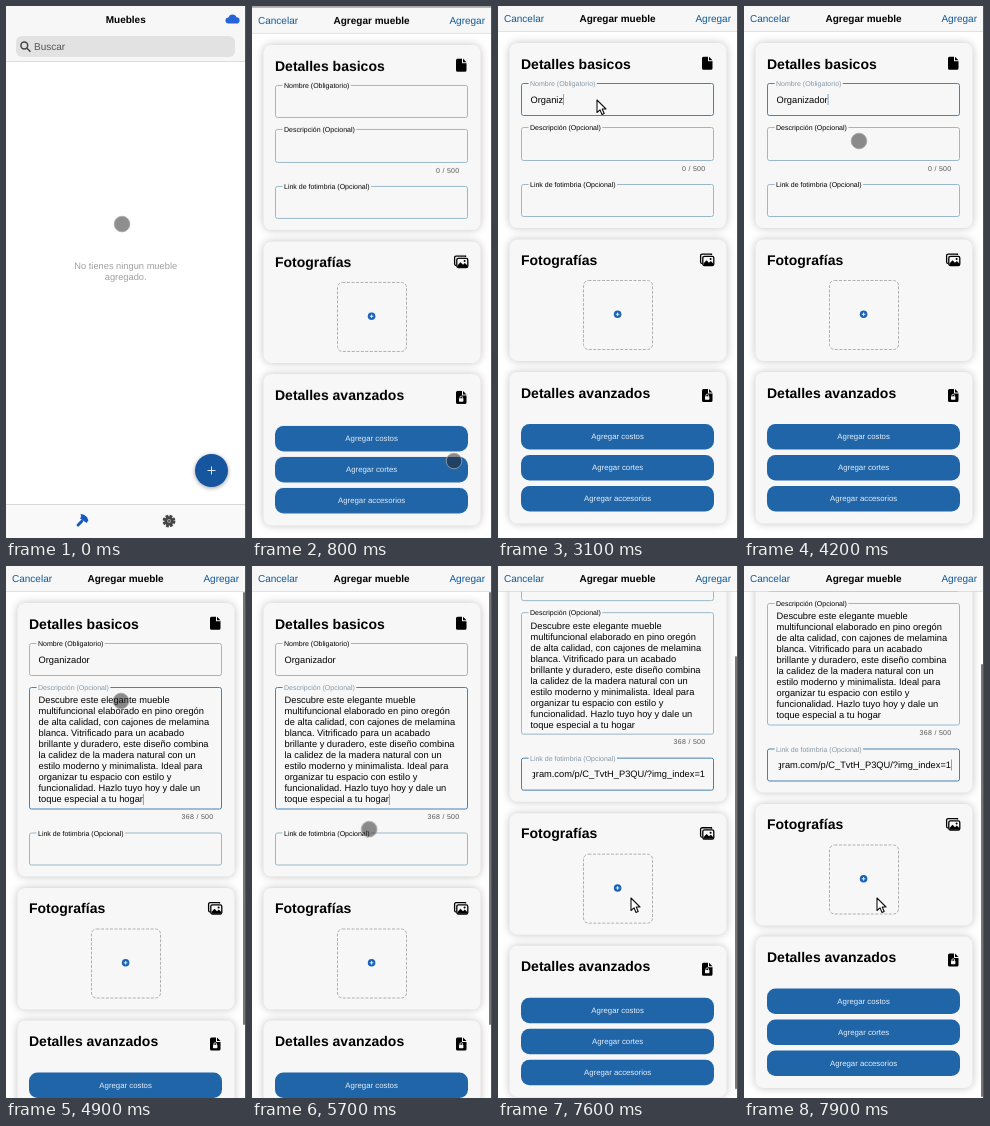
Animation, 240 px wide and 532 px high, one loop 8000 ms. Source, as an HTML page:

```html
<!DOCTYPE html>
<html lang="es">
<head>
<meta charset="utf-8">
<title>Agregar mueble</title>
<style>
  html, body { margin: 0; width: 100%; height: 100%; overflow: hidden; background: #fff; }
  svg { display: block; width: 100vw; height: 100vh; }
  text { font-family: "Liberation Sans", Arial, sans-serif; text-rendering: geometricPrecision; white-space: pre; }
  .title { font-size: 10px; font-weight: bold; text-anchor: middle; }
  .link { font-size: 10px; fill: #0f5898; }
  .heading { font-size: 14px; font-weight: bold; }
  .empty { font-size: 9.3px; fill: #a0a0a0; text-anchor: middle; }
  .value { font-size: 9.3px; fill: #000; }
  .count { font-size: 7px; letter-spacing: .3px; fill: #555; text-anchor: end; }
  .button rect { fill: #2065a8; }
  .button text { font-size: 7.8px; fill: #e4eef8; text-anchor: middle; }

  .card { fill: #f7f7f7; filter: drop-shadow(0 0 4px rgba(0, 0, 0, .24)); }
  .field rect { fill: none; stroke: #9bb8c8; }
  .field .label { font-size: 7px; fill: #000; stroke: #f7f7f7; stroke-width: 4px; paint-order: stroke; }
  .field.focus rect { stroke: #4583b0; }
  .field.focus .label { fill: #8799a8; }
  #caret { fill: #5f90b4; }

  /* The description grows once its text arrives */
  #thumb { visibility: hidden; }
  .long #thumb { visibility: visible; }
  .long .below { transform: translateY(88.5px); }
  .long #basics { height: 273.5px; }
  .long #desc rect { height: 121.5px; }

  #modal { animation: rise 8s linear infinite; }
  #shade { animation: dim 8s linear infinite; }
  #page { animation: scroll 8s linear infinite; }
  #thumb { animation: thumb 8s linear infinite; }
  #cursor { animation: move 8s ease-in-out infinite; }
  #dot { animation: dot 8s step-end infinite; }
  #arrow { animation: arrow 8s step-end infinite; }

  @keyframes rise {
    0%, 4.875% { transform: translateY(532px); animation-timing-function: cubic-bezier(.32, .72, 0, 1); }
    11.125%, 100% { transform: none; }
  }
  @keyframes dim {
    0%, 4.875% { opacity: 0; }
    11.125%, 100% { opacity: .4; }
  }
  @keyframes scroll {
    0%, 91% { transform: none; animation-timing-function: cubic-bezier(.3, .2, .3, 1); }
    97.5%, 100% { transform: translateY(-84px); }
  }
  @keyframes thumb {
    0%, 91% { transform: none; animation-timing-function: cubic-bezier(.3, .2, .3, 1); }
    97.5%, 100% { transform: translateY(72px); }
  }
  @keyframes move {
    0% { transform: translate(116px, 218px); }
    4%, 12.5% { transform: translate(202px, 455px); }
    22%, 45% { transform: translate(99px, 94px); }
    52%, 66.5% { transform: translate(115px, 135px); animation-timing-function: ease-in; }
    71.25% { transform: translate(117px, 263px); animation-timing-function: ease-out; }
    75%, 87.5% { transform: translate(143px, 290px); }
    92.5%, 100% { transform: translate(133px, 332px); }
  }
  @keyframes dot {
    0%, 46% { visibility: visible; }
    23%, 90%, 100% { visibility: hidden; }
  }
  @keyframes arrow {
    0%, 46% { visibility: hidden; }
    23%, 90%, 100% { visibility: visible; }
  }
</style>
</head>
<body>
<svg id="stage" viewBox="0 0 240 532" preserveAspectRatio="none">
  <defs>
    <clipPath id="linkClip"><rect x="34.6" y="184" width="174" height="24"/></clipPath>
    <path id="sheet" d="M1.5 0H6V4.5H10.5V11.5a1.5 1.5 0 0 1-1.5 1.5H1.5A1.5 1.5 0 0 1 0 11.5V1.5A1.5 1.5 0 0 1 1.5 0ZM7 0L10.5 3.5H7Z"/>
  </defs>

  <g id="list">
    <rect width="240" height="532" fill="#fff"/>
    <rect width="240" height="55" fill="#f7f7f7"/>
    <rect y="55" width="240" height="1" fill="#dcdcdc"/>
    <text class="title" x="119.7" y="16.5">Muebles</text>
    <path fill="#2464d8" d="M222.5 17.5a3 3 0 0 1 0-6a4.2 4.2 0 0 1 8-.2a3.1 3.1 0 0 1 0 6.2Z"/>
    <rect x="10" y="30" width="219" height="21" rx="6" fill="#e2e2e2"/>
    <g fill="none" stroke="#444" stroke-width="1.5" stroke-linecap="round">
      <circle cx="18.3" cy="39.5" r="3.4"/>
      <path d="M21 42.2L24 45.2"/>
    </g>
    <text x="28" y="44.3" font-size="10" fill="#555">Buscar</text>
    <text class="empty" x="119.7" y="263.3">No tienes ningun mueble</text>
    <text class="empty" x="119.7" y="274.3">agregado.</text>
    <circle cx="205.5" cy="464.5" r="16.5" fill="#15569e" style="filter:drop-shadow(0 1.5px 2px rgba(0,0,0,.4))"/>
    <path d="M201.5 464.5h8M205.5 460.5v8" stroke="#dce8f4"/>
    <rect y="498" width="240" height="34" fill="#f9f9f9"/>
    <rect y="498" width="240" height="1" fill="#d8d8d8"/>
    <g transform="translate(76 515) rotate(-45)" fill="#1558c0">
      <path d="M-5-5Q-2-7 2-6L5-4V-1H-3V-3Z" transform="rotate(78)"/>
      <rect x="-7" y="-1.400" width="8" height="2.800" rx="1" transform="rotate(-1)"/>
    </g>
    <g transform="translate(163 515)">
      <circle r="4.7" fill="#444"/>
      <circle r="5.3" fill="none" stroke="#444" stroke-width="2.2" stroke-dasharray="2.8 1.36"/>
      <circle r="1.9" fill="#aaa"/>
      <circle r="1" fill="#444"/>
    </g>
  </g>

  <rect id="shade" width="240" height="532"/>

  <g id="modal">
    <rect width="240" height="533" fill="#fff"/>
    <g id="page">
      <rect id="basics" class="card" x="11.5" y="37" width="217" height="185" rx="8"/>
      <text class="heading" x="23" y="62.7">Detalles basicos</text>
      <use href="#sheet" x="204" y="50.7"/>

      <g id="name" class="field">
        <rect x="23.5" y="77.5" width="192" height="32" rx="2"/>
        <text class="label" x="32" y="80.3">Nombre (Obligatorio)</text>
        <text id="nameText" class="value" x="32.5" y="96.5"></text>
      </g>
      <g id="desc" class="field">
        <rect x="23.5" y="121.5" width="192" height="33" rx="2"/>
        <text class="label" x="32" y="124.3">Descripción (Opcional)</text>
        <g id="descText"></g>
      </g>
      <g class="below">
        <text id="count" class="count" x="207.5" y="164.5">0 / 500</text>
        <g id="link" class="field">
          <rect x="23.5" y="178.5" width="192" height="32" rx="2"/>
          <text class="label" x="32" y="181.3">Link de fotimbria (Opcional)</text>
          <g clip-path="url(#linkClip)">
            <text id="linkText" class="value" x="207" y="197.5" text-anchor="end"></text>
          </g>
        </g>

        <rect class="card" x="11.5" y="233.5" width="217" height="121.5" rx="8"/>
        <text class="heading" x="23" y="258.7">Fotografías</text>
        <g transform="translate(202 247.5)" fill="none" stroke="#000" stroke-width="1.3">
          <path d="M11.500 1.500V.6H2.200A1.600 1.600 0 0 0 .6 2.200V8.500a1.500 1.500 0 0 0 1.500 1.500"/>
          <rect x="2.8" y="2.800" width="11" height="9.200" rx="1.600"/>
          <path d="M3.500 11.500V10L6.500 6.800L9 9.200L10.800 7.600L13.300 10V11.500Z" fill="#000" stroke="none"/>
          <circle cx="10.600" cy="5.500" r="1" fill="#000" stroke="none"/>
        </g>
        <rect x="85.500" y="274.500" width="69" height="69" rx="5" fill="none" stroke="#b0b0b0" stroke-dasharray="3 1.5"/>
        <circle cx="119.6" cy="308.3" r="3.8" fill="#1b62b8"/>
        <path d="M117.8 308.3h3.6M119.6 306.5v3.6" stroke="#dff" stroke-width=".9"/>

        <rect class="card" x="11.5" y="366" width="217" height="151.5" rx="8"/>
        <text class="heading" x="23" y="391.7">Detalles avanzados</text>
        <use href="#sheet" x="204" y="383"/>
        <rect x="207" y="390.300" width="4.400" height="3.400" rx=".6" fill="#f7f7f7"/>
        <path d="M207.900 390.500v-1a1.300 1.300 0 0 1 2.600 0v1" fill="none" stroke="#f7f7f7" stroke-width=".8"/>
        <g class="button"><rect x="23" y="418" width="193" height="25.5" rx="8.5"/><text x="119.6" y="433">Agregar costos</text></g>
        <g class="button"><rect x="23" y="449" width="193" height="25.5" rx="8.5"/><text x="119.6" y="464">Agregar cortes</text></g>
        <g class="button"><rect x="23" y="480" width="193" height="25.5" rx="8.5"/><text x="119.6" y="495">Agregar accesorios</text></g>
      </g>
      <rect id="caret" width=".8" height="11"/>
    </g>
    <rect width="240" height="25" fill="#f7f7f7"/>
    <rect y="25" width="240" height=".7" fill="#d4d4d4"/>
    <text class="link" x="6" y="16.2">Cancelar</text>
    <text class="title" x="119.6" y="16.2">Agregar mueble</text>
    <text class="link" x="233" y="16.2" text-anchor="end">Agregar</text>
    <rect id="thumb" x="237" y="26" width="2" height="433" rx="1" fill="#777"/>
  </g>

  <rect x="239" width="1" height="532" fill="#555"/>

  <g id="cursor">
    <circle id="dot" r="7.8" fill="rgba(30,30,30,.5)" stroke="rgba(165,165,165,.8)"/>
    <path id="arrow" d="M0 0V12.5L3 9.8L5 14.5L7.2 13.5L5.2 9H9Z" fill="#fff" stroke="#111" stroke-width="1.1" stroke-linejoin="round"/>
  </g>
</svg>
<script>
  const $ = id => document.getElementById(id);
  const LOOP = 8000;
  const NAME = "Organizador";
  const URL_END = "gram.com/p/C_TvtH_P3QU/?img_index=1";
  const LINES = [
    "Descubre este elegante mueble",
    "multifuncional elaborado en pino oregón",
    "de alta calidad, con cajones de melamina",
    "blanca. Vitrificado para un acabado",
    "brillante y duradero, este diseño combina",
    "la calidez de la madera natural con un",
    "estilo moderno y minimalista. Ideal para",
    "organizar tu espacio con estilo y",
    "funcionalidad. Hazlo tuyo hoy y dale un",
    "toque especial a tu hogar"
  ];
  const TIMES = { name: 1800, type: 2300, key: 120, desc: 4300, paste: 4800, link: 6200, url: 6600 };

  LINES.forEach((line, i) => {
    const row = document.createElementNS("http://www.w3.org/2000/svg", "text");
    row.setAttribute("class", "value");
    row.setAttribute("x", 32.5);
    row.setAttribute("y", 137.4 + i * 11);
    row.textContent = line;
    $("descText").append(row);
  });

  function placeCaret(focus, long, hasUrl) {
    const width = el => el.getComputedTextLength();
    const spots = {
      name: () => [32.5 + width($("nameText")), 88],
      desc: () => long ? [32.5 + width($("descText").lastChild), 228] : [32.5, 129.5],
      link: () => [hasUrl ? 207 : 32.5, long ? 277.5 : 189]
    };
    if (!focus) return;
    const [x, y] = spots[focus]();
    $("caret").setAttribute("x", x);
    $("caret").setAttribute("y", y);
  }

  function render(t) {
    const focus = ["link", "desc", "name"].find(id => t >= TIMES[id]);
    const long = t >= TIMES.paste;
    const hasUrl = t >= TIMES.url;
    const typed = Math.max(0, Math.floor((t - TIMES.type) / TIMES.key) + 1);

    for (const id of ["name", "desc", "link"]) $(id).classList.toggle("focus", id === focus);
    $("stage").classList.toggle("long", long);
    $("nameText").textContent = NAME.slice(0, typed);
    $("descText").style.display = long ? "" : "none";
    $("linkText").textContent = hasUrl ? URL_END : "";
    $("count").textContent = (long ? 368 : 0) + " / 500";

    const blink = t % 1000;
    $("caret").style.display = focus && (blink < 350 || blink > 650) ? "" : "none";
    placeCaret(focus, long, hasUrl);
  }

  // Share the clock of the CSS animations
  const clock = $("modal").getAnimations()[0];
  function tick() {
    const now = clock ? clock.currentTime || 0 : performance.now();
    render(now % LOOP);
    requestAnimationFrame(tick);
  }
  tick();
</script>
</body>
</html>
```
